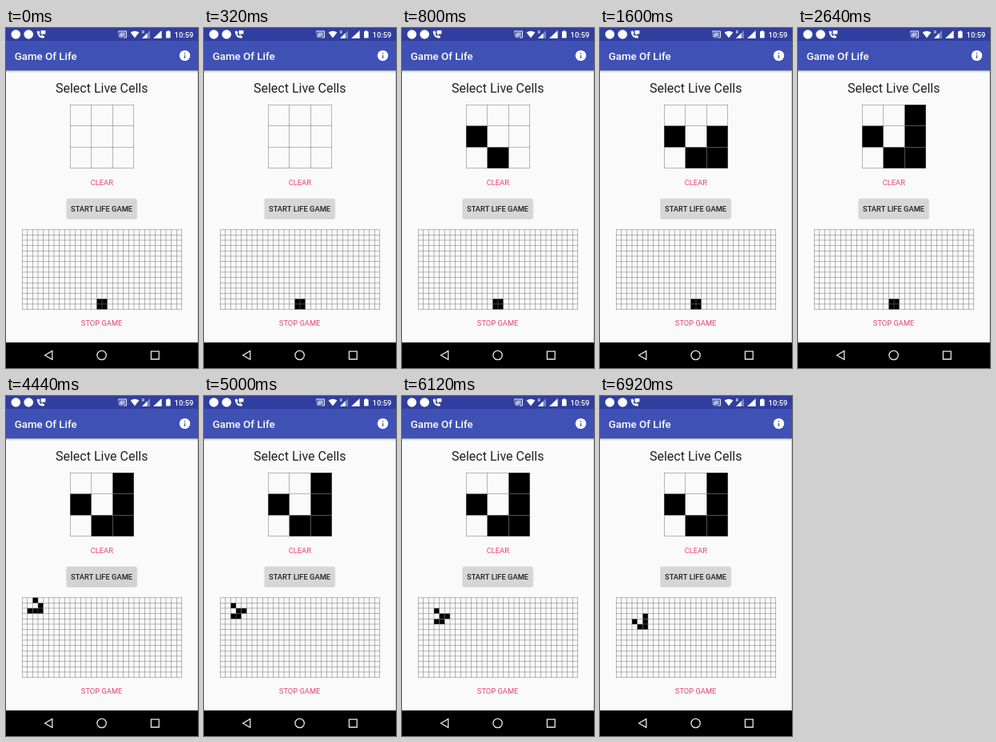
Write an HTML page with a canvas that moves like this. It is 240 px wide and 426 px high and loops after 7.04 s.

```html
<!DOCTYPE html>
<html lang="en">
<head>
<meta charset="utf-8">
<title>Game Of Life</title>
<style>
  html, body { margin: 0; width: 100%; height: 100%; overflow: hidden; background: #fafafa; }
  canvas { display: block; width: 240px; height: 426px; }
</style>
</head>
<body>
<canvas id="stage" width="240" height="426"></canvas>
<script>
const ctx = document.getElementById('stage').getContext('2d');
const LOOP = 7040;

// Taps on the selection grid: [time, column, row]
const taps = [[360, 0, 1], [800, 1, 2], [1320, 2, 2], [1600, 2, 1], [2640, 2, 0]];
const steps = [3920, 4200, 4480, 4720, 5000, 5280, 5560, 5840, 6120, 6400, 6640, 6920];
const block = [[14, 13], [15, 13], [14, 14], [15, 14]];

const picker = { x: 80, y: 96, cols: 3, rows: 3, size: 80 / 3 };
const board = { x: 20, y: 252.6, cols: 30, rows: 15, size: 20 / 3 };

function nextGeneration(cells) {
  const alive = new Set(cells.map(String));
  const counts = {};
  for (const [c, r] of cells)
    for (let i = -1; i <= 1; i++)
      for (let j = -1; j <= 1; j++)
        if (i || j) {
          const key = `${c + i},${r + j}`;
          counts[key] = (counts[key] || 0) + 1;
        }
  return Object.keys(counts)
    .filter(k => counts[k] === 3 || (counts[k] === 2 && alive.has(k)))
    .map(k => k.split(',').map(Number));
}

const generations = [];
steps.reduce(cells => {
  const next = nextGeneration(cells);
  generations.push(next);
  return next;
}, taps.map(([, c, r]) => [c, r]));

function rect(x, y, w, h, color) {
  ctx.fillStyle = color;
  ctx.fillRect(x, y, w, h);
}

function text(str, x, y, size, weight, color, align = 'center') {
  ctx.font = `${weight} ${size}px Roboto, sans-serif`;
  ctx.textAlign = align;
  ctx.fillStyle = color;
  ctx.fillText(str, x, y);
}

function disc(x, y, r, color) {
  ctx.fillStyle = color;
  ctx.beginPath();
  ctx.arc(x, y, r, 0, 7);
  ctx.fill();
}

function shape(d, color, width) {
  const path = new Path2D(d);
  if (width) {
    ctx.strokeStyle = color;
    ctx.lineWidth = width;
    ctx.stroke(path);
  } else {
    ctx.fillStyle = color;
    ctx.fill(path);
  }
}

// Hairlines are thinner than a pixel; the outer ones stay inside the grid.
function drawGrid({ x, y, cols, rows, size }, cells) {
  const line = 0.5;
  const color = '#707070';
  const w = cols * size;
  const h = rows * size;
  const offset = (i, length) => Math.min(length - line, Math.max(0, i * size - line / 2));
  for (const [c, r] of cells) rect(x + c * size, y + r * size, size, size, '#000');
  for (let c = 0; c <= cols; c++) rect(x + offset(c, w), y, line, h, color);
  for (let r = 0; r <= rows; r++) rect(x, y + offset(r, h), w, line, color);
}

function drawStatusBar() {
  const dim = 'rgba(255,255,255,.35)';
  rect(0, 0, 240, 16, '#303f9f');
  disc(12.3, 8, 5.8, '#fff');
  disc(28.2, 8, 5.8, '#fff');
  // call with speech bubble
  shape('M38.6 4.2 L41.4 3.6 42.6 6.4 41.4 7.6 Q42.4 9.3 44 10 L45.4 9 48 10.2 47.4 12.8 Q39.5 13 38.6 4.2Z', '#fff');
  shape('M43.6 3 H49.4 V7.6 H46.4 L44.6 9.2 V7.6 H43.6Z', '#fff');
  // cast
  shape('M140.8 6 V4 H150.4 V12 H147 M140.7 7.7 A4.5 4.5 0 0 1 145.2 12.2 M140.7 9.8 A2.4 2.4 0 0 1 143 12.2', '#fff', 1);
  rect(142.7, 5.5, 6, 5, 'rgba(255,255,255,.6)');
  // wifi
  shape('M155.6 5.6 Q161 1.8 166.4 5.6 L161 12.4Z', '#fff');
  // signals
  text('R', 171.3, 7, 5, 500, '#fff');
  shape('M170 13 H180 V3Z', dim);
  shape('M170 13 H176.5 V6.5Z', '#fff');
  shape('M184 13 H194.6 V3Z', '#fff');
  // battery
  shape('M200 4.2 H201.6 V3.2 H204 V4.2 H205.6 V12.6 H200Z', '#fff');
  text('10:59', 210.6, 11.6, 9.33, 500, '#fff', 'left');
}

function drawAppBar() {
  const shadow = ctx.createLinearGradient(0, 53, 0, 56);
  shadow.addColorStop(0, 'rgba(0,0,0,.22)');
  shadow.addColorStop(1, 'rgba(0,0,0,0)');
  rect(0, 53, 240, 3, shadow);
  rect(0, 16, 240, 37.3, '#3f51b5');
  text('Game Of Life', 10.7, 39.7, 13.33, 500, '#fff', 'left');
  disc(223.5, 34.6, 6.7, '#fff');
  rect(222.8, 31.3, 1.4, 1.4, '#3f51b5');
  rect(222.8, 34, 1.4, 4, '#3f51b5');
}

function drawNavBar() {
  rect(0, 394, 240, 32, '#000');
  shape('M57.8 404.6 V415.4 L48.6 410Z', '#e8e8e8', 1.3);
  shape('M125.3 410 A5.7 5.7 0 1 1 113.9 410 A5.7 5.7 0 1 1 125.3 410Z', '#e8e8e8', 1.3);
  shape('M181.4 405.2 H191.2 V415 H181.4Z', '#e8e8e8', 1.3);
}

function drawStartButton(press) {
  const shade = Math.round(214 - 21 * press);
  ctx.save();
  ctx.shadowColor = `rgba(0,0,0,${0.3 + 0.1 * press})`;
  ctx.shadowBlur = 2 + press;
  ctx.shadowOffsetY = 0.7;
  ctx.fillStyle = `rgb(${shade},${shade},${shade})`;
  ctx.beginPath();
  ctx.roundRect(76, 214, 87.2, 24, 1.4);
  ctx.fill();
  ctx.restore();
  text('START LIFE GAME', 119.6, 229.7, 9.33, 500, '#212121');
}

const ramp = (t, from, to) => Math.min(1, Math.max(0, (t - from) / (to - from)));

function draw(t) {
  const pink = '#ec407a';
  const selected = taps.filter(([at]) => t >= at).map(([, c, r]) => [c, r]);
  const generation = steps.filter(at => t >= at).length;

  rect(0, 0, 240, 426, '#fafafa');
  rect(239, 54, 1, 340, '#d0d0d0');
  drawStatusBar();
  drawAppBar();
  text('Select Live Cells', 119.7, 81, 16, 400, '#212121');
  drawGrid(picker, selected);
  text('CLEAR', 119.8, 197, 9.33, 400, pink);
  drawStartButton(ramp(t, 3560, 3760) - ramp(t, 4200, 4480));
  drawGrid(board, generation ? generations[generation - 1] : block);
  text('STOP GAME', 119.6, 373.2, 9.33, 400, pink);
  drawNavBar();
}

const start = performance.now();
function tick() {
  draw((performance.now() - start) % LOOP);
  requestAnimationFrame(tick);
}
tick();
</script>
</body>
</html>
```
